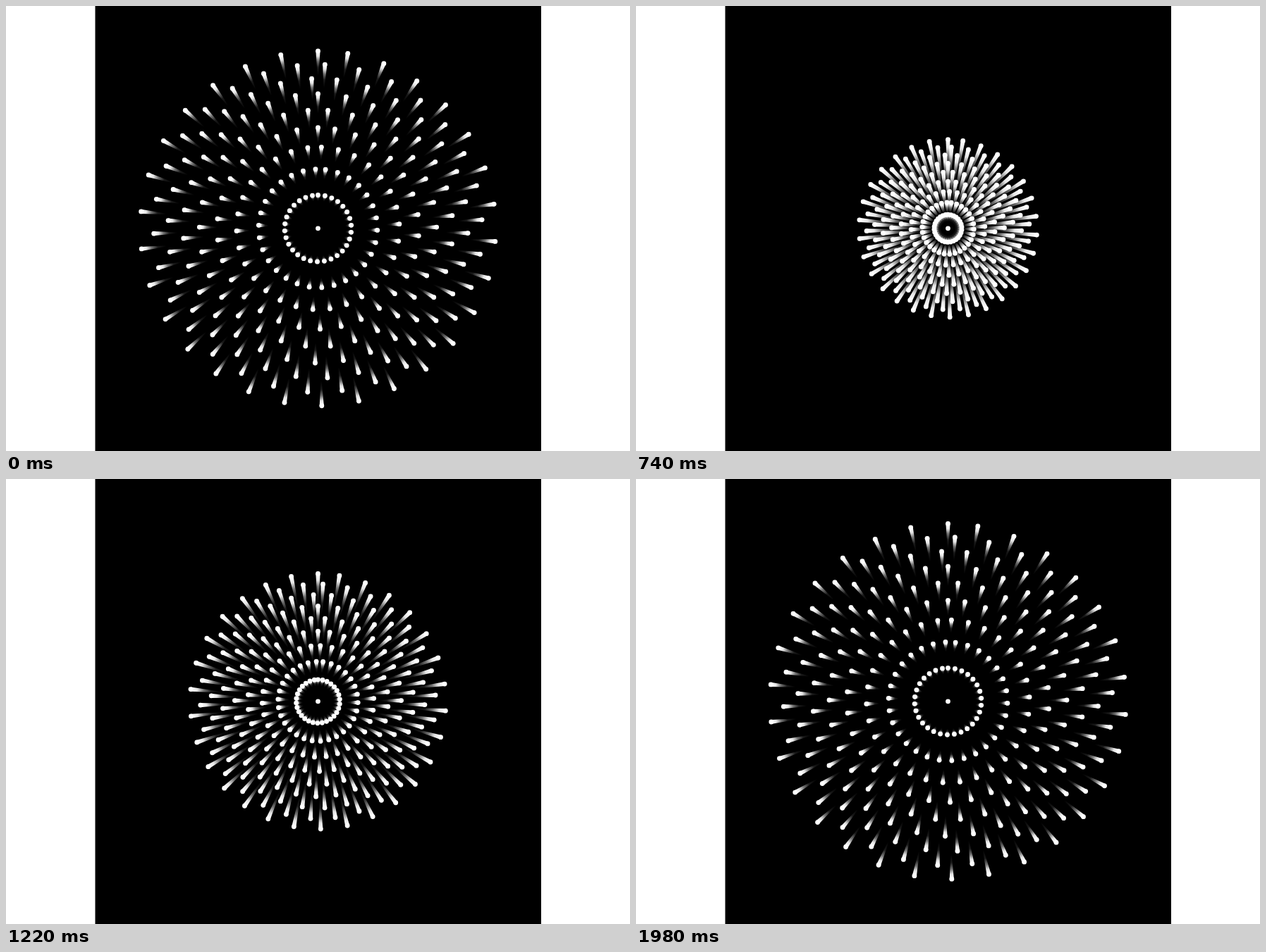
These frames come from a looping animation (885x632 px, 2000 ms). An HTML page with a canvas:

```html
<!DOCTYPE html>
<html lang="en">
<head>
<meta charset="utf-8">
<title>Radial burst</title>
<style>
html, body { margin: 0; width: 100%; height: 100%; overflow: hidden; background: #fff; }
canvas { display: block; width: 885px; height: 632px; }
</style>
</head>
<body>
<canvas id="stage" width="885" height="632"></canvas>
<script>
const ctx = document.getElementById('stage').getContext('2d');
const LOOP = 2000, STEP = 20;
const CX = 442.5, CY = 315.8;
const RINGS = 9, RAYS = 150, HEAD = 3.4, TRAIL = 0.4;
const FADE = [[0, 0], [0.35, 0.1], [0.6, 0.45], [0.8, 0.9], [1, 1]];

// Distance from the centre: quick at first, then slowing down.
const reach = (k, t) => Math.sqrt(15376 + 7089 * k * Math.max(t, 0)) - 124;

// Each ring takes every fifth ray, shifted by three rays from its neighbour.
function ringAngles(k) {
  const angles = [];
  for (let m = (RINGS - k) * 3 % 5; m < RAYS; m += 5) {
    angles.push(-Math.PI / 2 - m * 2 * Math.PI / (RAYS - 1));
  }
  return angles;
}
const rings = Array.from({ length: RINGS }, (_, i) => ({ k: i + 1, angles: ringAngles(i + 1) }));

function drawTrails({ k, angles }, t) {
  const far = reach(k, t), near = reach(k, t - TRAIL);
  const fill = ctx.createRadialGradient(CX, CY, near, CX, CY, far);
  for (const [at, alpha] of FADE) fill.addColorStop(at, `rgba(255,255,255,${alpha})`);
  ctx.fillStyle = fill;
  for (const a of angles) {
    const c = Math.cos(a), s = Math.sin(a);
    const point = (r, w) => [CX + c * r - s * w, CY + s * r + c * w];
    ctx.beginPath();
    ctx.moveTo(...point(near, 0.6));
    ctx.lineTo(...point(far, 3.1));
    ctx.lineTo(...point(far, -3.1));
    ctx.lineTo(...point(near, -0.6));
    ctx.fill();
  }
}

function dot(x, y) {
  ctx.beginPath();
  ctx.arc(x, y, HEAD, 0, 2 * Math.PI);
  ctx.fill();
}

function drawHeads({ k, angles }, t) {
  const r = reach(k, t);
  for (const a of angles) dot(CX + r * Math.cos(a), CY + r * Math.sin(a));
}

function draw(ms) {
  const frame = Math.floor(ms % LOOP / STEP);
  // The loop opens on the fully spread burst, then restarts from the centre.
  const t = frame ? frame * STEP / 1000 : 1.975;
  ctx.fillStyle = '#fff';
  ctx.fillRect(0, 0, 885, 632);
  ctx.fillStyle = '#000';
  ctx.fillRect(126.5, 0, 632.5, 632);
  for (const ring of rings) drawTrails(ring, t);
  ctx.fillStyle = '#fff';
  for (const ring of rings) drawHeads(ring, t);
  dot(CX, CY);
}

const start = performance.now();
function tick() {
  draw(performance.now() - start);
  requestAnimationFrame(tick);
}
tick();
</script>
</body>
</html>
```
